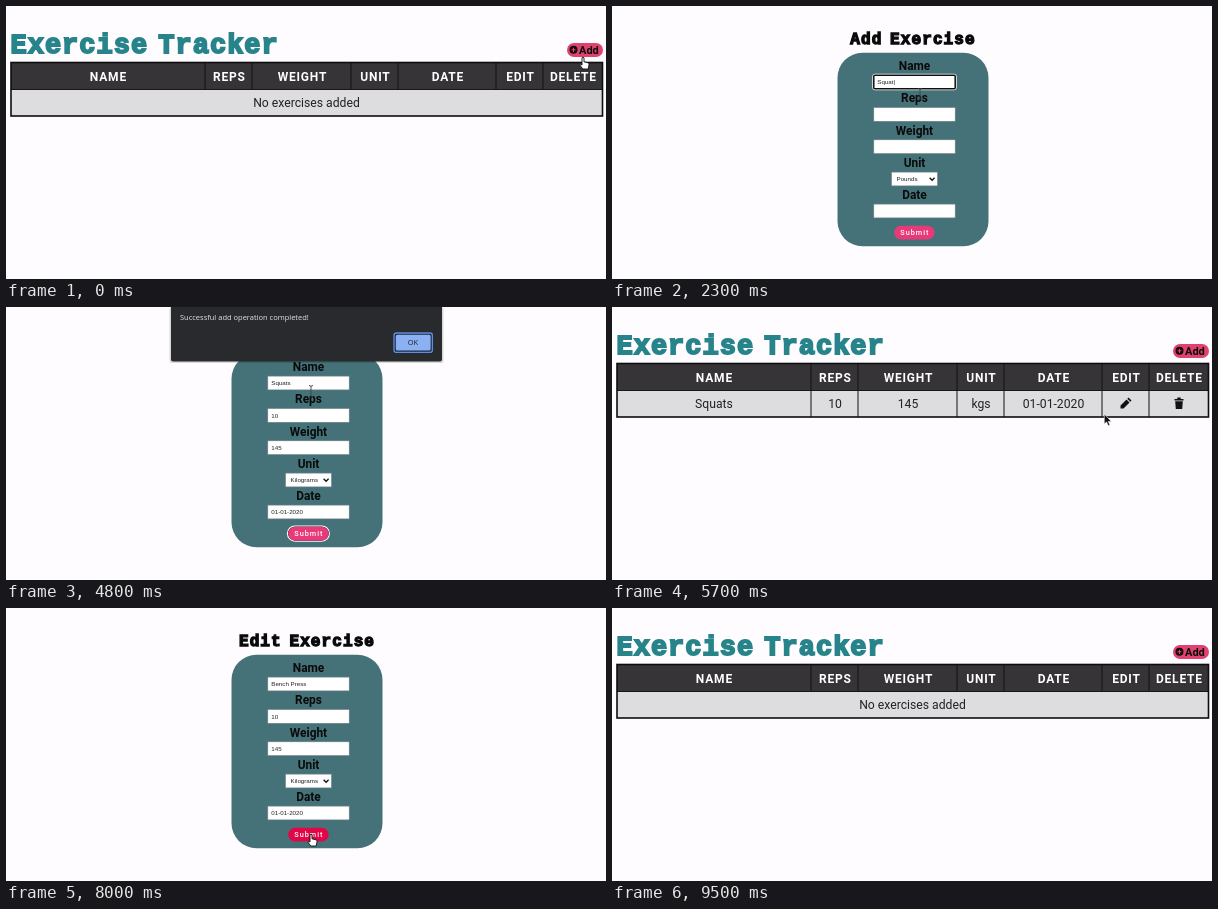
These frames come from a looping animation (600x273 px, 9.8 s). An HTML page:

```html
<!DOCTYPE html>
<html lang="en">
<head>
<meta charset="utf-8">
<title>Exercise Tracker</title>
<style>
html, body { margin: 0; width: 100%; height: 100%; overflow: hidden; background: #fefcfe; }
svg { display: block; width: 600px; height: 273px; }
text { font-family: Roboto, sans-serif; }
.mid { text-anchor: middle; }
.slab { font-family: "Liberation Mono", monospace; font-weight: 700; stroke-linejoin: miter; }
.title { font-size: 27px; letter-spacing: 1px; word-spacing: -7px; fill: #27848a; stroke: #27848a; stroke-width: 1.9px; }
.heading { font-size: 16px; letter-spacing: 1.1px; word-spacing: -3px; fill: #0b0a0b; stroke: #0b0a0b; stroke-width: 1.3px; }
.th { font-size: 12px; font-weight: 700; letter-spacing: .8px; fill: #fff; }
.td { font-size: 12.2px; fill: #222; }
.label { font-size: 11.9px; font-weight: 700; fill: #0a0a0b; }
.value { font: 6.2px "Liberation Sans", sans-serif; fill: #222; }
.submit { font-size: 7.3px; font-weight: 500; letter-spacing: 1px; fill: #fff; }
.alert { font: 7.5px "Open Sans", sans-serif; fill: #e4e5e8; }
</style>
</head>
<body>
<svg id="stage" viewBox="0 0 600 273"></svg>
<script>
const LOOP = 9800, STEP = 100;
const stage = document.getElementById('stage');

const rect = (x, y, w, h, fill, more = '') =>
  `<rect x="${x}" y="${y}" width="${w}" height="${h}" fill="${fill}" ${more}/>`;
const text = (x, y, cls, str, more = '') =>
  `<text x="${x}" y="${y}" class="${cls}" ${more}>${str}</text>`;
const path = (d, more) => `<path d="${d}" ${more}/>`;

// Table columns: heading, centre, right edge
const columns = [
  ['NAME', 102, 199], ['REPS', 223, 246], ['WEIGHT', 296, 345], ['UNIT', 369, 392],
  ['DATE', 441.5, 490], ['EDIT', 514, 537], ['DELETE', 567, 0]
];
const fields = [['Name', 76], ['Reps', 108.4], ['Weight', 140.7], ['Unit', 173], ['Date', 205]];

const pencil = path('M508.5 101.5v-3l6-6 3 3-6 6zM515.3 91.7l1.2-1.2 3 3-1.2 1.2z', 'fill="#111"');
const bin = path('M562.5 92h9v1.5h-9zM565.3 90.5h3.4v1.5h-3.4zM563.2 94.3h7.6l-.6 7.7h-6.4z', 'fill="#111"');

function listPage(name) {
  let out = text(4.5, 47, 'slab title', 'Exercise Tracker') +
    rect(561, 37, 36, 14, '#e0416f', 'rx="7"') +
    '<circle cx="567.5" cy="43.8" r="4" fill="#120a0d"/>' +
    path('M565.4 43.8h4.2M567.5 41.7v4.2', 'stroke="#e0416f" stroke-width="1.1"') +
    text(573, 47.8, 'label', 'Add', 'style="font-size:11px"') +
    rect(5, 56.5, 591.5, 53.5, '#dddcdf') + rect(5, 56.5, 591.5, 27, '#363437');
  for (const [head, x, edge] of columns) {
    out += text(x + .4, 74.8, 'mid th', head);
    if (edge) out += rect(edge - .5, 57, 1, name ? 53 : 26, '#121113');
  }
  out += rect(5, 83, 591.5, 1, '#171618');
  if (name) {
    [name, '10', '145', 'kgs', '01-01-2020'].forEach((v, i) => {
      out += text(columns[i][1], 101, 'mid td', v);
    });
    out += pencil + bin;
  } else {
    out += text(300.5, 101, 'mid td', 'No exercises added');
  }
  return out + rect(5, 56.5, 591.5, 53.5, 'none', 'stroke="#0d0c0e" stroke-width="1.6"');
}

const ring = (x, y, w, h) =>
  rect(x, y, w, h, 'none', 'rx="1.5" stroke="#fff" stroke-width="3"') +
  rect(x, y, w, h, '#fff', 'rx="1" stroke="#101010" stroke-width="1.5"');

function formPage({ heading, values, focus, selected, hover }) {
  let out = text(301, 37.6, 'slab heading mid', heading) +
    rect(225.5, 46.8, 151, 193.4, '#457278', 'rx="25"');
  fields.forEach(([label, y], i) => {
    const unit = label === 'Unit', on = focus === i;
    const x = unit ? 279.5 : 261.8, w = unit ? 46 : 81.4;
    out += text(302.5, y - 12, 'label mid', label);
    out += on ? ring(x, y - 6.8, w, 13.6)
      : rect(x, y - 6.9, w, 13.8, '#fff', 'stroke="#6d7f83" stroke-width=".6"');
    if (on && selected) out += rect(265, y - 4, 19.5, 8, '#3b78d8');
    out += text(unit ? 284.5 : 265.3, y + 2.3, 'value', values[i] + (on && !unit && !selected ? '|' : ''),
      on && selected ? 'style="fill:#fff"' : '');
    if (unit) out += path('M317.6 171.8l2.5 2.5 2.5-2.5', 'fill="none" stroke="#111" stroke-width="1.3"');
  });
  if (focus === 5) out += rect(281.4, 219, 42, 15.2, '#222', 'rx="7.6" stroke="#fff" stroke-width="1.1"');
  return out + rect(282.2, 219.8, 40.4, 13.8, hover ? '#e00648' : '#e83a78', 'rx="6.9"') +
    text(302.9, 229.2, 'submit mid', 'Submit');
}

function alertBox(verb, hover) {
  return rect(163.5, 0, 274, 56, '#000', 'opacity=".14" rx="2"') +
    rect(165, -3, 271, 57.5, '#292a2d', 'rx="2"') +
    text(174, 13.3, 'alert', `Successful ${verb} operation completed!`) +
    rect(388, 26, 38.4, 19.4, '#1c2a44', 'rx="2.5" stroke="#5f8fdc" stroke-width="1.3"') +
    rect(389.8, 27.8, 34.8, 15.8, hover ? '#7fa3e4' : '#8cb0f4', 'rx="1.5"') +
    text(407, 38.2, 'alert mid', 'OK', 'style="fill:#20242c"');
}

const pointers = {
  arrow: path('M0 0v10l2.3-2 1.7 3.8 1.7-.8-1.7-3.6h3.1z', 'fill="#111" stroke="#fff" stroke-width=".6"'),
  hand: path('M-1 .8q1-1.4 2 0v4l4 1q1.3.4 1 2l-.8 4.2h-5.4l-3-4q.2-1.6 2.2 0z',
    'fill="#fff" stroke="#111" stroke-width=".9"'),
  beam: path('M-2-5.5q2 0 2 1.2 0-1.2 2-1.2M0-4.5v9M-2 5.5q2 0 2-1.2 0 1.2 2 1.2',
    'fill="none" stroke="#444" stroke-width=".9"')
};

// Pointer route: step, x, y, shape
const route = [
  [0, 577, 51, 'hand'], [5, 574, 45, 'hand'], [10, 570, 40, 'hand'], [11, 570, 39, 'arrow'],
  [12, 560, 42, 'arrow'], [17, 308, 76, 'beam'], [20, 308, 88, 'beam'], [41, 308, 88, 'beam'],
  [44, 305, 84, 'beam'], [49, 305, 84, 'arrow'], [51, 330, 110, 'arrow'], [54, 430, 140, 'arrow'],
  [58, 513, 96, 'hand'], [61, 513, 96, 'hand'], [62, 505, 96, 'arrow'], [65, 304, 78, 'beam'],
  [67, 304, 88, 'beam'], [76, 304, 88, 'arrow'], [78, 340, 170, 'arrow'], [80, 305, 226, 'hand'],
  [82, 305, 226, 'arrow'], [85, 411, 37, 'arrow'], [87, 411, 37, 'arrow'], [88, 450, 60, 'arrow'],
  [91, 567, 96, 'hand'], [94, 570, 94, 'hand'], [95, 0, 0, '']
];

function pointer(n) {
  let i = route.length - 1;
  while (route[i][0] > n) i--;
  const [start, x, y, shape] = route[i];
  if (!shape) return '';
  const [end, x2, y2] = route[i + 1];
  const k = route[i + 1][3] ? (n - start) / (end - start) : 0;
  return `<g transform="translate(${x + (x2 - x) * k} ${y + (y2 - y) * k})">${pointers[shape]}</g>`;
}

const typed = (str, n, from, to) =>
  str.slice(0, Math.round(str.length * Math.min(1, Math.max(0, (n - from) / (to - from)))));

function addForm(n) {
  const starts = [18, 25, 28, 31, 36, 40];
  return formPage({
    heading: 'Add Exercise',
    values: [typed('Squats', n, 18, 24), typed('10', n, 25, 27), typed('145', n, 27, 30),
      n < 35 ? 'Pounds' : 'Kilograms', typed('01-01-2020', n, 36, 39)],
    focus: starts.filter(s => n >= s).length - 1
  });
}

function editForm(n) {
  return formPage({
    heading: 'Edit Exercise',
    values: [n < 68 ? 'Squats' : typed('Bench Press', n, 68, 77), '10', '145', 'Kilograms', '01-01-2020'],
    focus: n >= 66 && n < 80 ? 0 : -1,
    selected: n === 67,
    hover: n >= 80
  });
}

function scene(n) {
  if (n < 11) return listPage();
  if (n < 49) return addForm(n) + (n >= 42 ? alertBox('add') : '');
  if (n < 62) return listPage('Squats');
  if (n < 87) return editForm(n) + (n >= 82 ? alertBox('edit', n >= 85) : '');
  return listPage(n < 94 ? 'Bench Press' : '');
}

let shown = -1;
function draw(now) {
  const n = Math.min(95, Math.floor(now % LOOP / STEP));
  if (n !== shown) {
    shown = n;
    stage.innerHTML = rect(0, 0, 600, 273, '#fefcfe') + scene(n) + pointer(n);
  }
  requestAnimationFrame(draw);
}
draw(performance.now());
</script>
</body>
</html>
```
